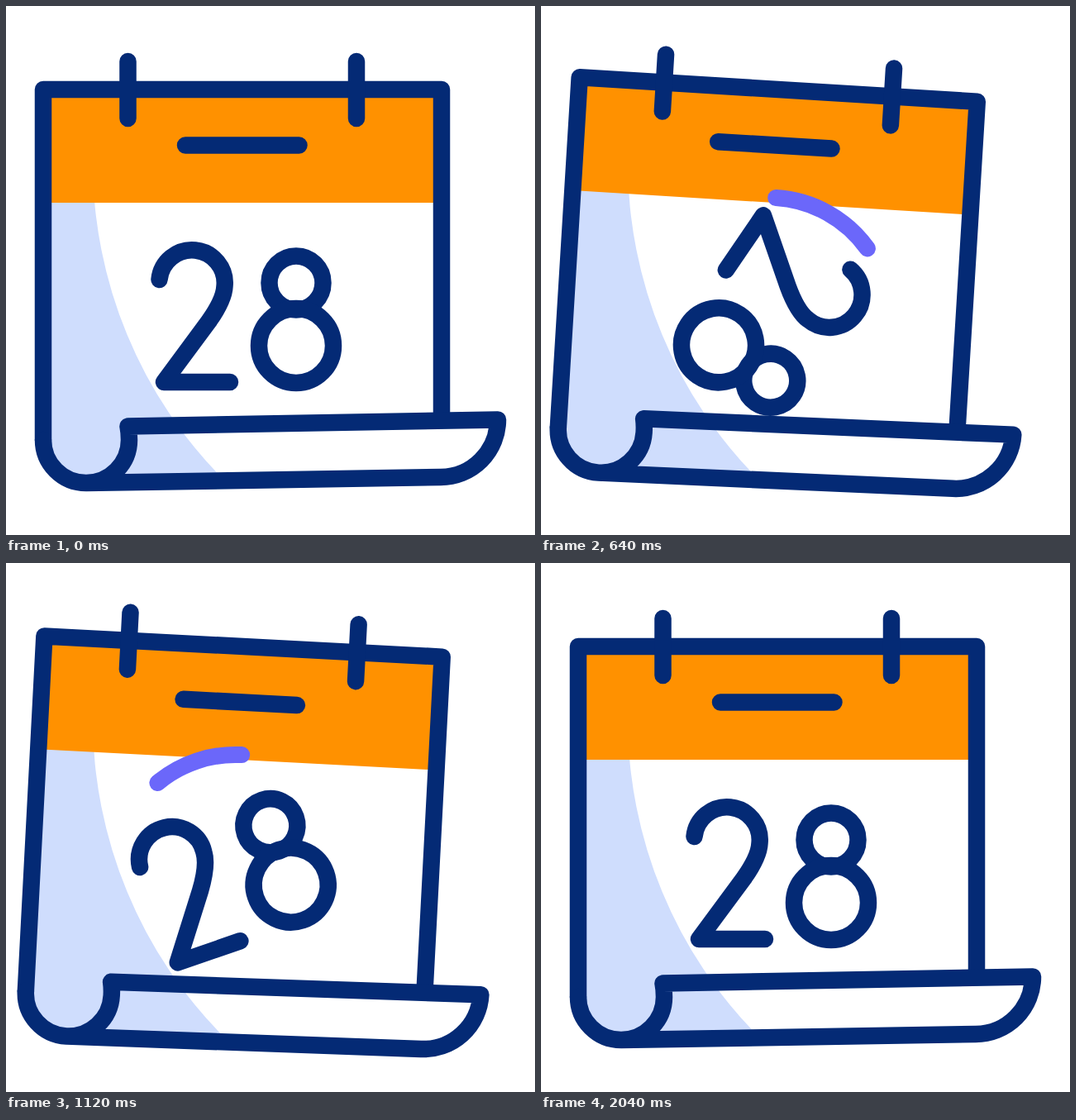
Recreate the animation shown at these times as an HTML page. Size 640x640 px, loop 2400 ms.

```html
<!DOCTYPE html>
<html lang="en">
<head>
<meta charset="utf-8">
<title>Calendar</title>
<style>
  html, body { margin: 0; width: 100%; height: 100%; overflow: hidden; background: #fff; }
  svg { display: block; width: 100%; height: 100%; }
  .ink { fill: none; stroke: #042a75; stroke-width: 20.5; stroke-linecap: round; stroke-linejoin: round; }
  .shade { fill: #cfddfd; }
  .header { fill: #ff9100; }
  .trail { fill: none; stroke: #6b67fa; stroke-width: 20; stroke-linecap: round; }
</style>
</head>
<body>
<svg viewBox="0 0 640 640">
  <clipPath id="inside"><path id="page"/></clipPath>

  <!-- The shadow edge stays still while the page swings through it -->
  <g clip-path="url(#inside)">
    <path class="shade" fill-rule="evenodd"
      d="M0 0H640V640H0ZM105 189a545 545 0 0 0 1090 0a545 545 0 0 0 -1090 0Z"/>
  </g>

  <g id="calendar">
    <path class="header" d="M45 101H527V238H45Z"/>
    <g class="ink">
      <path id="sides"/>
      <path d="M147.5 67V136M424 67V136M217 168.5H354.5"/>
      <path id="curl" d="M45 525A52 52 0 0 0 149 525Q149 516 147.5 508.5L595 500.5A69.5 69.5 0 0 1 526 570L97 577"/>
      <g id="number">
        <path d="M185.5 331A39.7 39.7 0 0 1 264.5 339C264 352 255 368 245 382L191 455H271"/>
        <circle cx="351" cy="335" r="32.5"/>
        <circle cx="351" cy="411" r="45"/>
      </g>
    </g>
    <circle id="trail" class="trail" cx="291" cy="379" r="147" pathLength="100" transform="rotate(-90 291 379)"/>
  </g>
</svg>
<script>
  const LOOP = 2400, STEP = 40;
  const el = id => document.getElementById(id);
  const [page, calendar, sides, curl, number, trail] =
    ['page', 'calendar', 'sides', 'curl', 'number', 'trail'].map(el);

  // Keys are [time, value]
  const SWAY = [[0, 0], [280, -5], [560, 5], [840, -3], [1120, 3], [1400, -2], [1680, 2], [2000, 0]];
  const DROP = [[1040, 0], [1300, 28], [1600, -13], [2040, 0]];
  const SPIN = [[320, 0], [1400, 360]];
  const HEAD = [[500, 0], [1070, 100]];
  const TAIL = [[670, 0], [1250, 100]];

  const sine = u => (1 - Math.cos(Math.PI * u)) / 2;

  // Same curve as cubic-bezier(1/3, 0, 1/3, 1)
  function swing(u) {
    let lo = 0, hi = 1;
    for (let i = 0; i < 24; i++) {
      const s = (lo + hi) / 2;
      if (s - s * s + s ** 3 < u) lo = s; else hi = s;
    }
    return lo * lo * (3 - 2 * lo);
  }

  function at(keys, t, ease = sine) {
    if (t <= keys[0][0]) return keys[0][1];
    for (let i = 1; i < keys.length; i++) {
      const [t0, a] = keys[i - 1], [t1, b] = keys[i];
      if (t < t1) return a + (b - a) * ease((t - t0) / (t1 - t0));
    }
    return keys[keys.length - 1][1];
  }

  function draw(t) {
    const drop = at(DROP, t);
    const y = v => v + drop;
    const tilt = `rotate(${at(SWAY, t)} 286 121)`;

    calendar.setAttribute('transform', tilt);
    page.setAttribute('transform', tilt);
    page.setAttribute('d', `M45 170H527V${y(500)}L595 ${y(500.5)}A69.5 69.5 0 0 1 526 ${y(570)}` +
      `L97 ${y(577)}A52 52 0 0 1 45 ${y(525)}Z`);
    sides.setAttribute('d', `M45 ${y(525)}V101H527V${y(498)}`);
    curl.setAttribute('transform', `translate(0 ${drop})`);
    number.setAttribute('transform', `rotate(${at(SPIN, t, swing)} 291 379)`);

    const head = at(HEAD, t), tail = at(TAIL, t), length = head - tail;
    trail.style.display = length > 0.05 ? '' : 'none';
    trail.setAttribute('stroke-dasharray', `${length} 100`);
    trail.setAttribute('stroke-dashoffset', -tail);
  }

  const start = performance.now();
  function tick() {
    const t = (performance.now() - start) % LOOP;
    draw(Math.floor(t / STEP) * STEP);
    requestAnimationFrame(tick);
  }
  tick();
</script>
</body>
</html>
```
